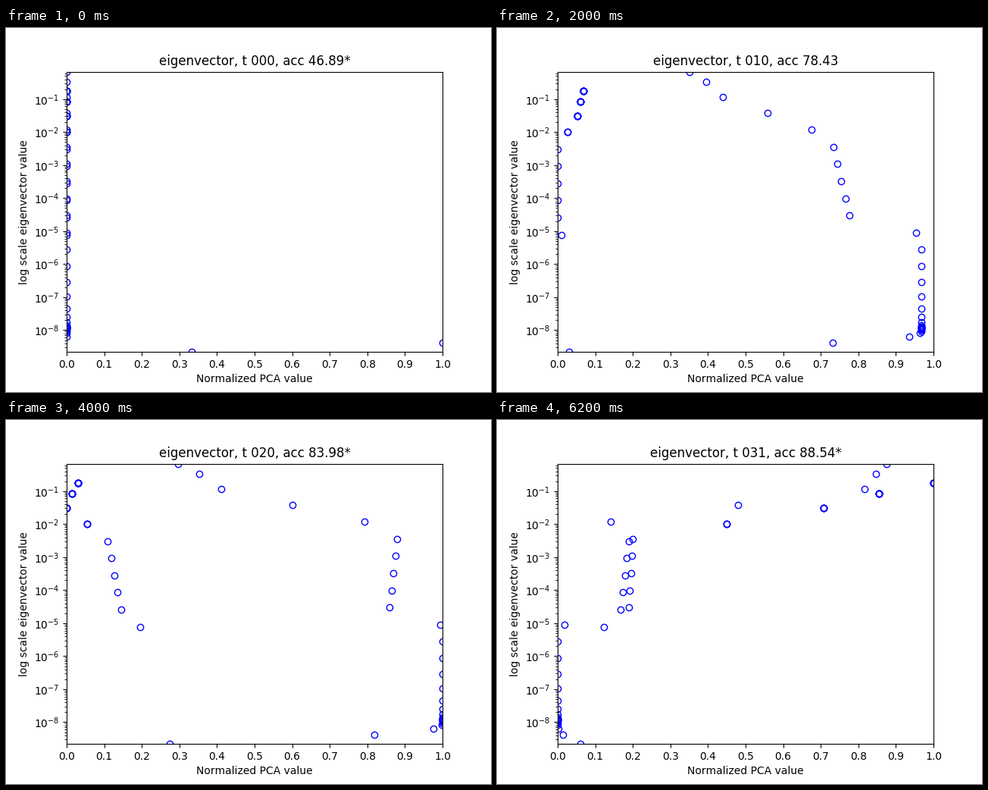
A matplotlib script for the animation above (6400 ms loop, 640 by 480 pixels).

```python
import matplotlib.pyplot as plt
import numpy as np
from matplotlib.animation import FuncAnimation
from matplotlib.ticker import LogLocator, NullFormatter

plt.rcParams["text.kerning_factor"] = 6

STEPS, INTERVAL = 32, 200
FLIP_STEP = 23                    # the component changes sign here
LOG_TOP, LOG_FLOOR = -0.17, -7.92

# Ranks within the main chain, the degenerate branch and the tail below the
# noise floor; the branch starts with multiplicities 9, 7, 5, 3, 1.
chain = np.arange(25)
branch = np.repeat(np.arange(10), np.maximum(1, 9 - 2 * np.arange(10)))
tail = np.arange(7, -1, -1)


def decay(rank):
    return LOG_TOP - 0.521 * rank + 0.33 * (1 - np.exp(-rank))


def add_floor(log_value, softness=0.7):
    total = 10 ** (softness * log_value) + 10 ** (softness * LOG_FLOOR)
    return total ** (1 / softness)


values = np.concatenate([
    10 ** (decay(branch) - 0.585),
    add_floor(decay(chain)),
    10 ** (LOG_FLOOR - 0.74 * 0.615 ** tail),
])

# Each pose: x of the chain at CHAIN_KNOTS, of the branch at BRANCH_KNOTS,
# and of the smallest eigenvalue.
CHAIN_KNOTS = [0, 2, 4, 5, 9, 10, 11]
BRANCH_KNOTS = [0, 2, 4, 8, 9]
POSES = {
    4: ([1, .919, .798, .796, .796, .593, .591],
        [.04, .022, 0, .002, .006], .014),
    10: ([.351, .44, .675, .734, .776, .954, .967],
         [.069, .052, 0, 0, .01], .03),
    14: ([.288, .353, .655, .762, .8, .99, .98],
         [.038, .038, 0, .028, .042], .065),
    20: ([.296, .411, .792, .879, .859, .994, 1],
         [.03, 0, .109, .145, .196], .274),
    26: ([.835, .746, .129, .125, .129, .01, 0],
         [1, .919, .512, .423, .333], .185),
    31: ([.875, .817, .141, .2, .19, .018, 0],
         [1, .708, .19, .167, .123], .06),
}

ACCURACY = {0: 46.89, 3: 71.2, 4: 70.65, 9: 78.6, 10: 78.43, 13: 80.1,
            14: 79.82, 20: 83.98, 25: 88.1, 26: 87.91, 31: 88.54}
accuracy = np.interp(np.arange(STEPS), list(ACCURACY), list(ACCURACY.values()))


def orient(x, step):
    return 1 - x if step >= FLIP_STEP else x


def expand(pose):
    chain_x, branch_x, end = pose
    floor = chain_x[-1]
    return np.concatenate([
        np.interp(branch, BRANCH_KNOTS, branch_x),
        np.interp(chain, CHAIN_KNOTS, chain_x),
        floor + (end - floor) * 0.25 ** (tail ** 1.3),
    ])


key_steps = np.array(list(POSES))
key_x = [orient(expand(pose), step) for step, pose in POSES.items()]


def positions(step):
    if step == 0:
        x = np.zeros(len(values))
        x[-2:] = 1, 1 / 3
        return x
    i = np.clip(np.searchsorted(key_steps, step) - 1, 0, len(key_steps) - 2)
    u = (step - key_steps[i]) / (key_steps[i + 1] - key_steps[i])
    x = key_x[i] + u * (key_x[i + 1] - key_x[i])
    return orient(np.clip(x, 0, 1), step)


def title_text(step):
    is_best = step == 0 or accuracy[step] > accuracy[:step].max()
    mark = "*" if is_best else ""
    return f"eigenvector, t {step:03d}, acc {accuracy[step]:.2f}{mark}"


fig, ax = plt.subplots(figsize=(6.4, 4.8), dpi=100)
ax.set_yscale("log")
points, = ax.plot(positions(0), values, "o", color="b", fillstyle="none")
ax.set_xlim(0, 1)
ax.set_ylim(values.min(), values.max())
ax.set_xticks(np.arange(11) / 10)
ax.yaxis.set_major_locator(LogLocator(numticks=20))
ax.yaxis.set_minor_locator(LogLocator(subs=np.arange(2, 10), numticks=20))
ax.yaxis.set_minor_formatter(NullFormatter())
ax.set_xlabel("Normalized PCA value")
ax.set_ylabel("log scale eigenvector value")
title = ax.set_title(title_text(0))


def update(step):
    points.set_xdata(positions(step))
    title.set_text(title_text(step))
    return points, title


anim = FuncAnimation(fig, update, frames=STEPS, interval=INTERVAL,
                     repeat=True, repeat_delay=0)
plt.show()
```
